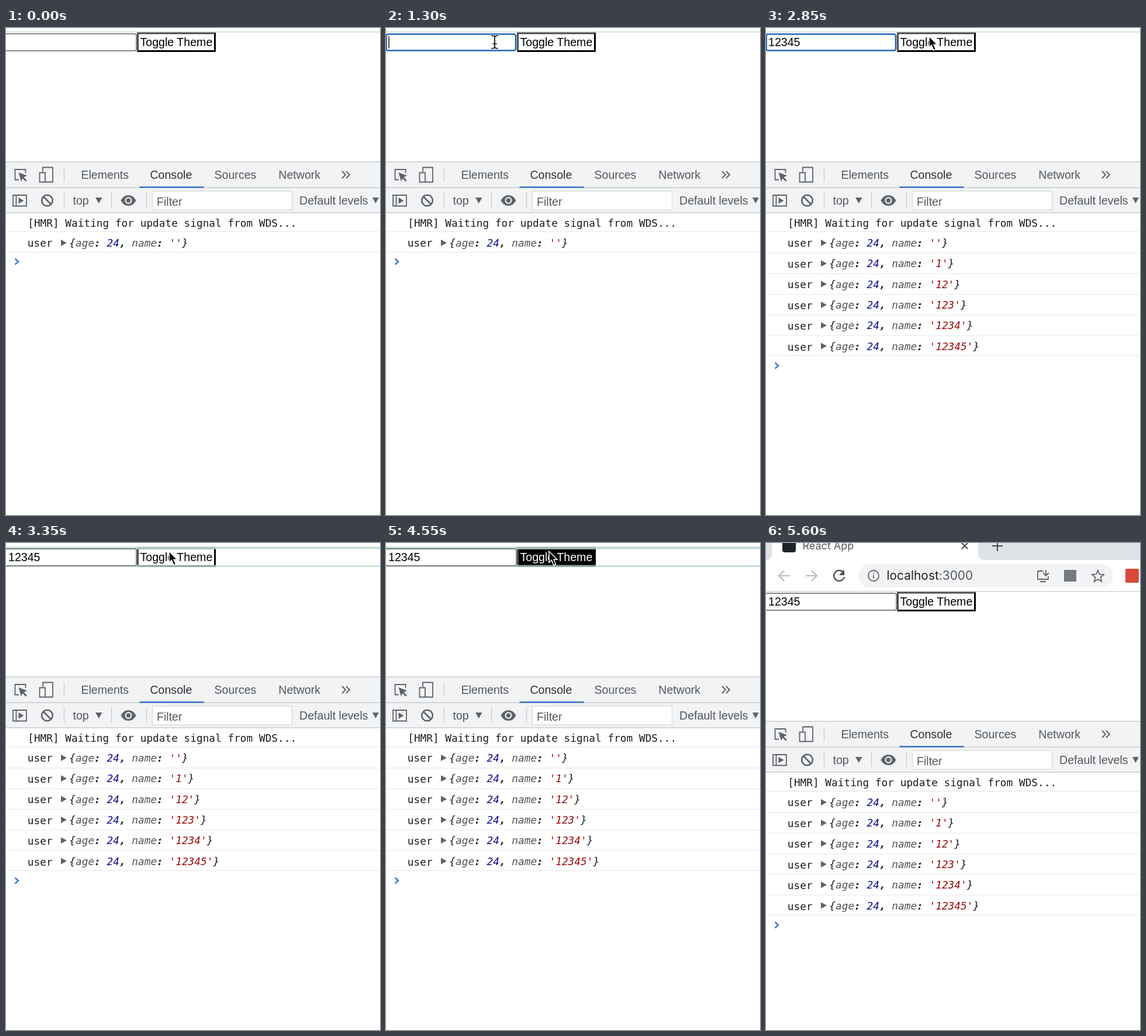
These frames come from a looping animation (640x833 px, 5.68 s). An HTML page:

```html
<!DOCTYPE html>
<html lang="en">
<head>
<meta charset="utf-8">
<title>Theme toggle and console</title>
<style>
  html, body { margin: 0; width: 100%; height: 100%; overflow: hidden; background: #fff; }
  svg { display: block; width: 100vw; height: 100vh; }
  text { font: 19.6px "Liberation Sans", Arial, sans-serif; fill: #54585d; }
  .mono { font: 17.78px "DejaVu Sans Mono", monospace; fill: #191c20; }
  .object { font-style: oblique; }
  .mark { font-weight: bold; }
  .key { fill: #525252; }
  .number { fill: #0c0c8a; }
  .string { fill: #980c0c; }
  .ui { font-family: Inter, sans-serif; }
  .icon { fill: none; stroke: #5f6368; stroke-width: 1.8; }
  .solid { fill: #5f6368; }
  .rule { stroke: #cacdd1; stroke-width: 1.4; }
  .thin { stroke: #ececec; stroke-width: 1.3; }
</style>
</head>
<body>
<svg viewBox="0 0 640 833" preserveAspectRatio="none">
  <defs>
    <path id="beam" d="M-5-11Q0-11 0-8V8Q0 11-5 11M5-11Q0-11 0-8M0 8Q0 11 5 11M-3 3H3"/>
  </defs>
  <g id="view">
    <g id="browser" transform="translate(0 -76)">
      <path fill="#dee1e6" d="M0-20H640V29H0Z"/>
      <path fill="#fff" d="M0 29Q10 29 10 17V-20H363V17Q363 29 375 29H640V82H0Z"/>
      <rect x="28" y="-8" width="23" height="24" rx="4" fill="#20232a"/>
      <text class="ui" x="62.500" y="11" style="font-size:18px">React App</text>
      <path class="icon" style="stroke:#45494d;stroke-width:2" d="M335 0l10 10m0-10l-10 10M387 5h18m-9-9v18"/>
      <path class="icon" style="stroke:#b6b9bd;stroke-width:2" d="M41 56H22m9-9l-9 9 9 9M68 56h19m-9-9l9 9-9 9"/>
      <path class="icon" style="stroke:#484c50;stroke-width:2.200" d="M132 50A9 9 0 1 0 134 58"/>
      <path fill="#484c50" d="M134 46v9h-9z"/>
      <rect x="158" y="36" width="436" height="40" rx="20" fill="#f1f3f4"/>
      <circle class="icon" cx="184" cy="56" r="9"/>
      <path class="icon" d="M184 55v6m0-10v2"/>
      <text class="ui" x="206.500" y="63" style="font-size:20.900px"><tspan fill="#202124">localhost</tspan>:3000</text>
      <path class="icon" d="M474 48h-9v14h18v-5M469 66h10M479 46v10m-5-5l5 5 5-5"/>
      <rect x="510" y="46" width="21" height="20" fill="#777b80"/>
      <path class="icon" d="M568 46.500l2.800 6.800 7.200.6-5.500 4.800 1.700 7.100-6.200-3.800-6.200 3.800 1.700-7.100-5.500-4.800 7.200-.6z"/>
      <rect x="615" y="44" width="23" height="24" rx="2" fill="#d9483b"/>
    </g>

    <path stroke="#d3d5d8" stroke-width="1.400" d="M0 6.700H640"/>
    <g>
      <rect id="face" x="224" y="7.500" width="135" height="33.500"/>
      <path fill="#4c4c4c" d="M224 41V7.500H359L356 10.500H227V38Z"/>
      <path fill="#000" d="M359 7.500V41H224L227 38H356V10.500Z"/>
      <text id="label" x="229.500" y="31">Toggle Theme</text>
    </g>
    <g id="highlight" fill="none">
      <path stroke="#f0f0f0" stroke-opacity=".55" stroke-width="4" d="M0 9H640M0 39.600H640"/>
      <path id="glow" stroke-opacity=".75" stroke-width="1.800" d="M0 9H640M0 39.600H640"/>
    </g>
    <rect id="input" rx="3" fill="#fff"/>
    <text id="value" x="4" y="31" style="fill:#000"></text>
    <path id="caret" stroke="#000" stroke-width="1.400" d="M0 14V35"/>

    <g id="devtools">
      <path fill="#f1f3f4" d="M0 229H640V316H0Z"/>
      <path class="rule" d="M0 229H640M0 273H640M0 316H640M99.500 239V263M99.500 281V307M180.500 281V307M240.500 281V307"/>
      <path fill="#3974c8" d="M228.500 271h110v2.400h-110z"/>
      <path class="icon" d="M22 259.500H15.500V242H33.500V248"/>
      <path class="solid" d="M21.500 247l14.500 5.500-5.500 2.700 5.300 5.500-2 2-5.500-5.500-2.500 5z"/>
      <path class="icon" d="M63 246V238.500H80V263.500H67M57.500 247.500H67V263.500H57.500Z"/>
      <path class="icon" style="stroke-width:2" d="M575 245l6 6-6 6m7-12l6 6-6 6"/>
      <text x="128.400" y="258">Elements</text>
      <text x="246.400" y="258" style="fill:#2d3034">Console</text>
      <text x="356.500" y="258">Sources</text>
      <text x="466.300" y="258">Network</text>
      <path class="icon" d="M12 286H35V304.500H12ZM17.500 286V304.500"/>
      <path class="solid" d="M21.500 290v10.500l9-5.200z"/>
      <g class="icon" style="stroke-width:2.600">
        <circle cx="70.500" cy="295" r="9.300"/><path d="M64 288.500l13 13"/>
      </g>
      <text x="114.500" y="302">top</text>
      <path class="solid" d="M153 290h11.500l-5.700 10zM627 290h11l-5.500 10z"/>
      <path class="solid" fill-rule="evenodd" d="M196.500 295Q201 286 209.500 286T222.500 295Q218 304 209.500 304T196.500 295ZM203.500 295a6 6 0 1 0 12 0a6 6 0 1 0-12 0Z"/>
      <circle class="solid" cx="209.500" cy="295" r="3.700"/>
      <rect x="250.500" y="279" width="239" height="32" fill="#fff" stroke="#d8dbdf" stroke-width="1.300"/>
      <text x="258" y="303.500">Filter</text>
      <text x="502" y="302">Default levels</text>
      <text class="mono" x="37.200" y="340">[HMR] Waiting for update signal from WDS...</text>
      <path class="thin" d="M0 348.500H640"/>
      <g id="rows"></g>
      <path id="prompt" fill="none" stroke="#3b76d2" stroke-width="2.400" d="M15.500-5l5.500 5-5.500 5"/>
    </g>
  </g>

  <path id="arrow" stroke="#fff" stroke-width="1.500" d="M0 0V19.500L4.400 15.400 8 24 11.600 22.500 8 14.200H13.800Z"/>
  <g id="ibeam" fill="none" stroke-linecap="round">
    <use href="#beam" stroke="#fff" stroke-width="3.600"/>
    <use href="#beam" stroke="#000" stroke-width="1.700"/>
  </g>
</svg>
<script>
const LOOP = 5680, STEP = 50, PAN = 76;
const KEY_TIMES = [1550, 1750, 1950, 2100, 2250];
const TOGGLE_TIMES = [3000, 3300, 3600, 3900, 4100, 4300, 4500, 4800];
const FOCUS = 1100, BLUR = 3000, PAN_START = 5050, PAN_END = 5300;

// Pointer path: time, x, y
const POINTER = [
  [50, 85, 348], [250, 85, 348], [400, 66, 300], [600, 110, 150],
  [800, 190, 40], [1000, 186, 24], [2300, 186, 24], [2700, 279, 14],
  [5050, 279, 14], [5200, 279, -30]
];

const el = id => document.getElementById(id);
const set = (id, attrs) => {
  for (const name in attrs) el(id).setAttribute(name, attrs[name]);
};
const show = (node, on) => { node.style.display = on ? "" : "none"; };
const passed = (times, t) => times.filter(time => time <= t).length;
const clamp = v => Math.min(1, Math.max(0, v));
const smooth = v => v * v * (3 - 2 * v);
const span = (kind, text) => `<tspan class="${kind}">${text}</tspan>`;

function logRow(i) {
  const y = 374 + 35.3 * i;
  const age = span("key", "age") + span("mark", ":") + " " + span("number", 24);
  const name = span("key", "name") + span("mark", ":") + " " + span("string", `'${"12345".slice(0, i)}'`);
  return `<g>
    <text class="mono" x="36.800" y="${374 + 35.6 * i}">user</text>
    <path class="solid" d="M94 ${y - 12}v11l10-5.500z"/>
    <text class="mono object" x="108.300" y="${y}">{${age}${span("mark", ",")} ${name}}</text>
    <path class="thin" d="M0 ${y + 11}H640"/>
  </g>`;
}
el("rows").innerHTML = Array.from({ length: 6 }, (_, i) => logRow(i)).join("");
const rows = [...el("rows").children];

function pointerAt(t) {
  const next = POINTER.findIndex(point => point[0] > t);
  if (next < 1) return null;
  const [t0, x0, y0] = POINTER[next - 1], [t1, x1, y1] = POINTER[next];
  const p = smooth((t - t0) / (t1 - t0));
  return [x0 + (x1 - x0) * p, y0 + (y1 - y0) * p];
}

function drawPage(t) {
  const typed = passed(KEY_TIMES, t);
  const focused = t >= FOCUS && t < BLUR;
  const dark = passed(TOGGLE_TIMES, t) % 2 === 1;

  el("value").textContent = "12345".slice(0, typed);
  set("input", focused
    ? { x: 0.5, width: 221.5, y: 10.5, height: 28, stroke: "#2066b8", "stroke-width": 2.6 }
    : { x: -2, width: 225, y: 10, height: 29, stroke: "#626262", "stroke-width": 1.4 });
  set("caret", { transform: `translate(${5 + typed * 10.9} 0)` });
  show(el("caret"), focused && t < 2700);

  set("face", { fill: dark ? "#000" : "#fff" });
  el("label").style.fill = dark ? "#fff" : "#000";
  show(el("highlight"), (t >= 1550 && t < 2600) || (t >= 3000 && t < 5100));
  set("glow", { stroke: t >= 4300 ? "#8fc4b9" : "#a4d0ae" });

  rows.forEach((row, i) => {
    show(row, i <= typed);
    row.lastElementChild.setAttribute("transform", `translate(0 ${i === typed ? -1.4 : 0})`);
  });
  set("prompt", { transform: `translate(0 ${399.5 + 35.6 * typed})` });
}

function drawPointer(t) {
  const point = pointerAt(t);
  const overInput = point && point[0] < 224 && point[1] < 45;
  show(el("ibeam"), point && overInput);
  show(el("arrow"), point && !overInput);
  if (point) set(overInput ? "ibeam" : "arrow", { transform: `translate(${point})` });
}

function frame(now) {
  const t = Math.floor(now % LOOP / STEP) * STEP;
  const pan = PAN * smooth(clamp((t - PAN_START) / (PAN_END - PAN_START)));
  set("view", { transform: `translate(0 ${pan})` });
  drawPage(t);
  drawPointer(t);
  requestAnimationFrame(frame);
}
frame(performance.now());
</script>
</body>
</html>
```
